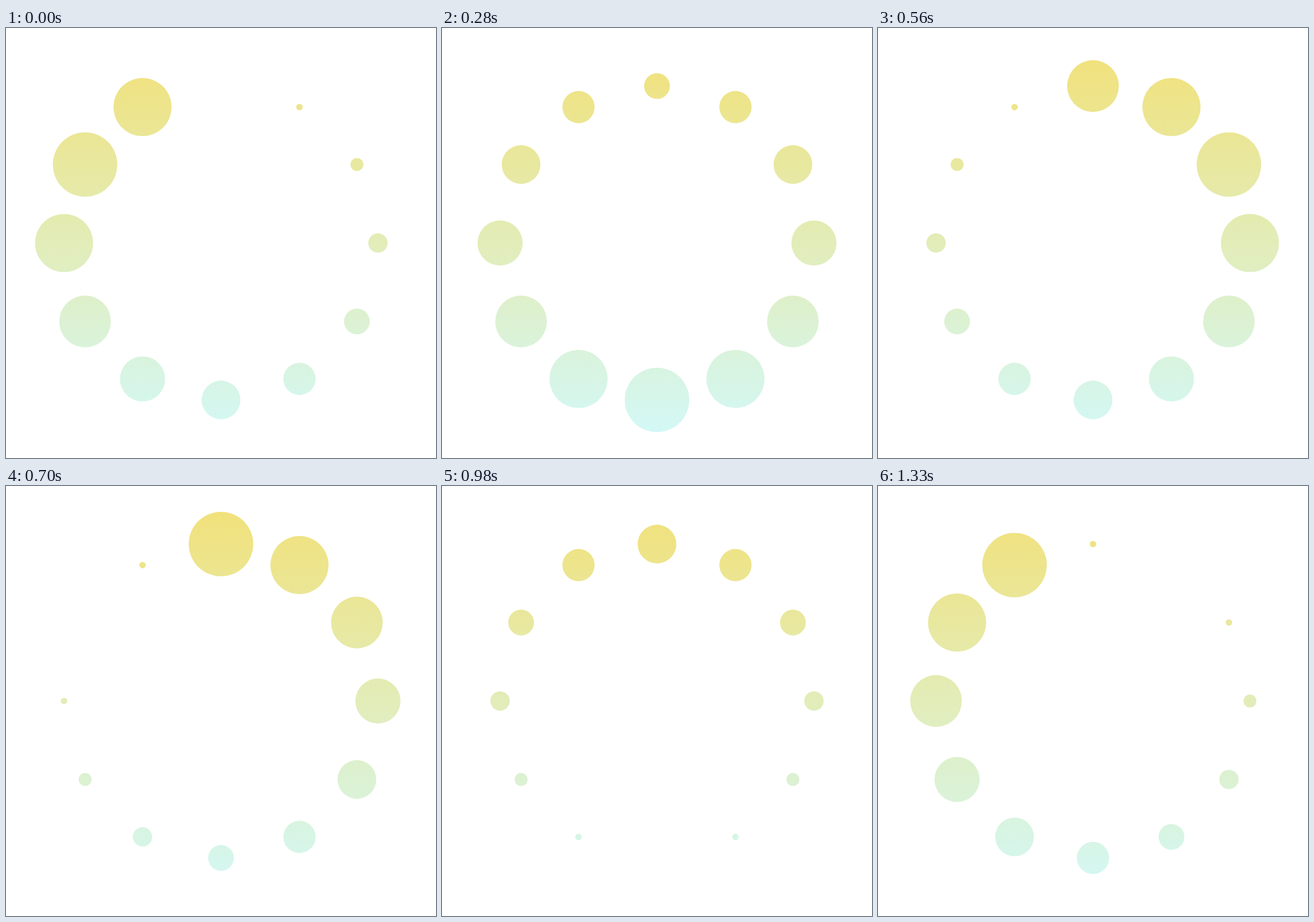
Animation of 748x748 px, one loop 1400 ms. Source, as an HTML page:

```html
<!DOCTYPE html>
<html lang="en">
<head>
<meta charset="utf-8">
<title>Ring of dots</title>
<style>
  html, body { margin: 0; width: 100%; height: 100%; overflow: hidden; background: #fff; }
  svg { display: block; width: 100%; height: 100%; }
</style>
</head>
<body>
<svg viewBox="0 0 748 748">
  <defs>
    <linearGradient id="fade" gradientUnits="userSpaceOnUse" x1="0" y1="45" x2="0" y2="703">
      <stop offset="0" stop-color="#f1e17b"/>
      <stop offset="1" stop-color="#d3f8f6"/>
    </linearGradient>
  </defs>
  <g id="ring" fill="url(#fade)"></g>
</svg>
<script>
const CENTER = 374, RING = 273, MAX_R = 56.1;
const COUNT = 12, STEP = 70, STEPS = 20;
const ring = document.getElementById('ring');

const dots = Array.from({ length: COUNT }, (_, i) => {
  const angle = i / COUNT * 2 * Math.PI;
  const dot = document.createElementNS(ring.namespaceURI, 'circle');
  dot.setAttribute('cx', CENTER + RING * Math.sin(angle));
  dot.setAttribute('cy', CENTER - RING * Math.cos(angle));
  return ring.appendChild(dot);
});

// Triangle wave from 0 to 1 and back over one loop
const wave = n => 1 - Math.abs(n % STEPS / (STEPS / 2) - 1);

function draw(time) {
  const step = Math.floor(time / STEP);
  dots.forEach((dot, i) => dot.setAttribute('r', MAX_R * wave(step + i)));
}

function tick(time) {
  draw(time);
  requestAnimationFrame(tick);
}

draw(0);
requestAnimationFrame(tick);
</script>
</body>
</html>
```
